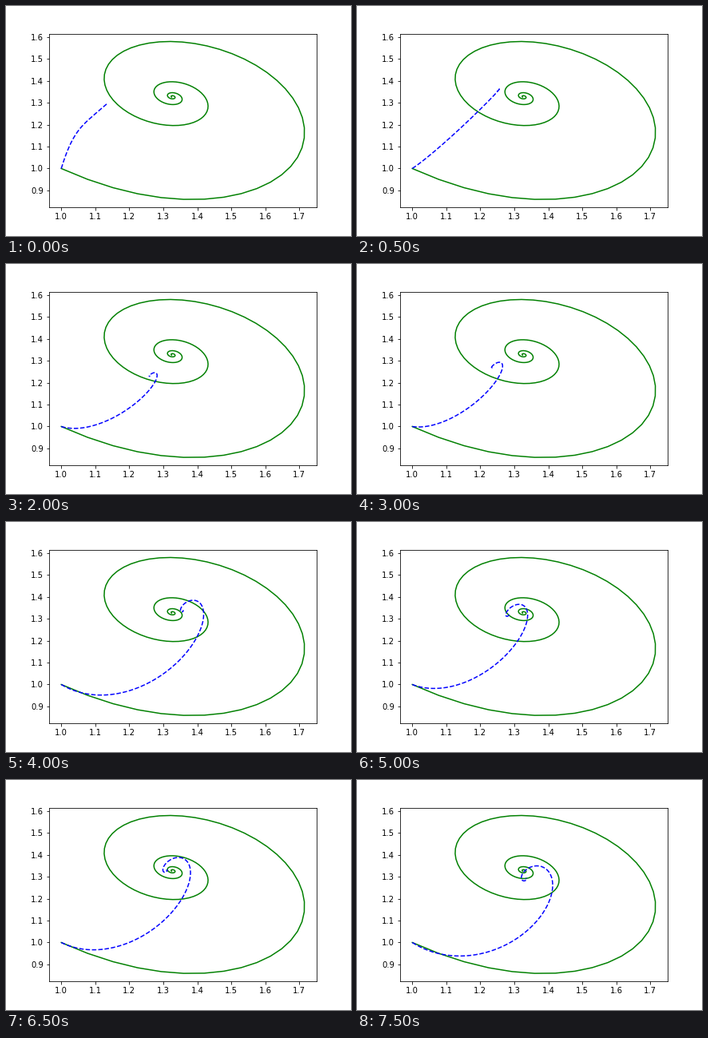
Recreate the animation shown at these times as a matplotlib script. Size 432 by 288 pixels, loop 8 s.

```python
import numpy as np
import matplotlib.pyplot as plt
from matplotlib.animation import FuncAnimation

STEPS = 16
START = 1.0

# Key points of the drifting rest point, measured from the start.
KEYS = [0, 2, 4, 5, 6, 8, 10, 11, 13, 15]
GAP_X = [.134, .366, .26, .355, .235, .358, .283, .361, .31, .334]
GAP_Y = [.295, .414, .23, .41, .267, .337, .318, .417, .33, .291]


def settle(t, gap, swing, damping):
    """Distance from the rest point of a damped linear system."""
    c, s = (np.cosh, np.sinh) if damping > 1.3 else (np.cos, np.sin)
    return np.exp(-damping * t) * (swing * s(t) - gap * c(t))


def true_path():
    t = np.arange(0, 25, 0.125)
    fade = np.exp(-2 * t)
    x = 1.327 + settle(t, 0.327, 0.492, 0.2075) + 0.07 * t * fade
    y = 1.3275 + settle(t, 0.382, -0.412, 0.2075) + 0.0545 * fade
    return x, y


def fitted_path(step):
    t = np.arange(0, 14, 0.04)
    gx, gy = (np.interp(step, KEYS, gap) for gap in (GAP_X, GAP_Y))
    # The damping relaxes as the fit improves and sets the first push.
    damping = 0.55 + 0.52 * np.exp((2 - step) / 4)
    push_x = gx * (1.05 - 1.35 * damping)
    push_y = 0.24 - 2.05 * gx
    return (START + gx + settle(t, gx, push_x, damping),
            START + gy + settle(t, gy, push_y, damping))


fig, ax = plt.subplots(figsize=(6, 4), dpi=72)
fig.subplots_adjust(bottom=0.125)
spiral = true_path()


def draw(step):
    ax.clear()
    ax.plot(*spiral, "g-")
    ax.plot(*fitted_path(step), "b--")
    return ax.lines


anim = FuncAnimation(fig, draw, frames=STEPS, interval=500,
                     init_func=lambda: draw(0), repeat=True, repeat_delay=0)
plt.show()
```
